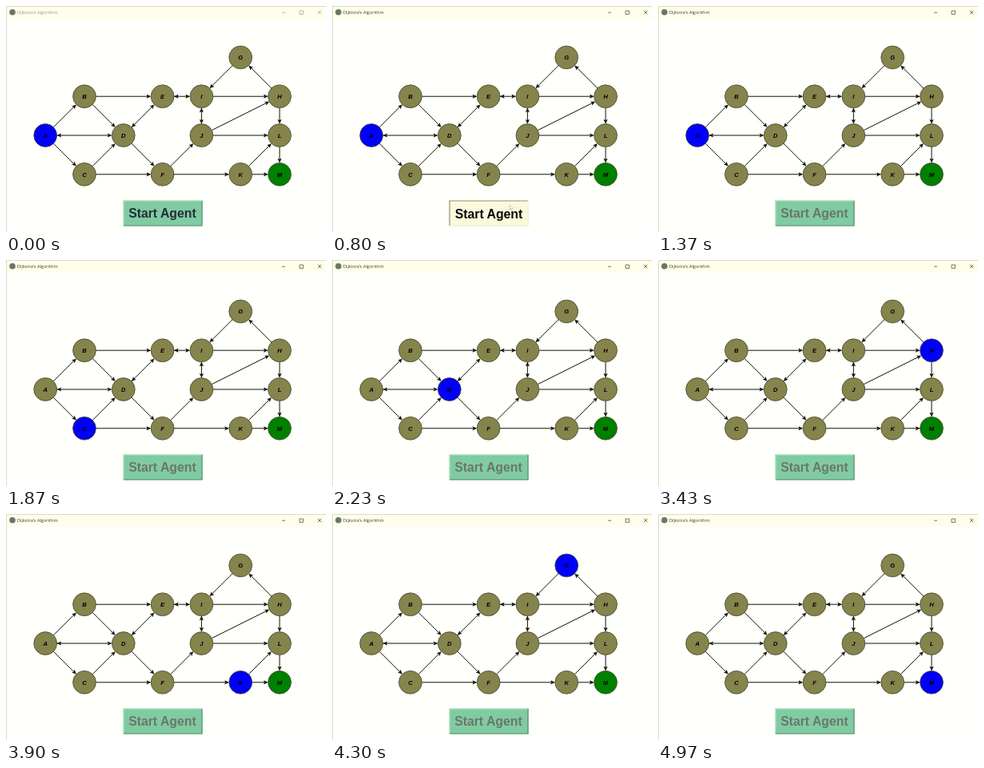
An HTML page that plays this animation: 400x283 px, repeating every 5010 ms.

```html
<!DOCTYPE html>
<html lang="en">
<head>
<meta charset="utf-8">
<title>Dijkstra's Algorithm</title>
<style>
  html, body { margin: 0; width: 100%; height: 100%; overflow: hidden; background: #fffffb; }
  svg { display: block; width: 100vw; height: 100vh; }
  .title { font: 5.6px "Open Sans", "Noto Sans", sans-serif; }
  .label { font: italic bold 7.6px "Liberation Sans", Arial, sans-serif; text-anchor: middle; }
  .button { font: bold 15.8px "Liberation Sans", Arial, sans-serif; text-anchor: middle; }
  .edge { stroke: #111108; stroke-width: 1; }
</style>
</head>
<body>
<svg viewBox="0 0 400 283">
  <rect width="400" height="283" fill="#fffffb"/>
  <rect width="400" height="16" fill="#fffeea"/>
  <path d="M0.5 283V0.5H400" fill="none" stroke="#d2d2b8" stroke-width="0.8"/>
  <circle cx="8" cy="7.8" r="3.8" fill="#68776a"/>
  <text id="title" class="title" x="14" y="9.8">Dijkstra's Algorithm</text>
  <path id="controls" d="M345 8.2h4M367 6h4.4v4.4h-4.4zM389.8 5.8l4.4 4.4M394.2 5.8l-4.4 4.4" fill="none" stroke-width="0.8"/>
  <g id="edges"></g>
  <g id="nodes"></g>
  <rect id="face" x="146.5" y="243.5" width="99" height="32"/>
  <path id="lit" d="M147 275V244H245" fill="none" stroke-width="1.2"/>
  <path id="shade" d="M147 275H245V244" fill="none" stroke-width="1.2"/>
  <text id="caption" class="button" y="265.4">Start Agent</text>
  <path id="cursor" d="M222 249v6l1.4-1.3 1 2.2.9-.4-1-2.1h1.8z" fill="#fff" stroke="#999984" stroke-width="0.5"/>
</svg>
<script>
const LOOP = 5010, RADIUS = 14.4, KHAKI = '#85844c';

// grid column and row, 48.8 px apart
const grid = {
  A: [0, 2], B: [1, 1], C: [1, 3], D: [2, 2], E: [3, 1], F: [3, 3], G: [5, 0],
  H: [6, 1], I: [4, 1], J: [4, 2], K: [5, 3], L: [6, 2], M: [6, 3]
};
const links = 'A>B A>C A=D B>D B>E C>D C>F D=E D>F E=I F>J F>K G>I H>G I>H I=J J>H J>L H>L K>L K>M L>M';
const visits = [
  [0, 'A'], [1500, 'B'], [1800, 'C'], [2100, 'D'], [2400, 'F'], [2700, 'E'], [3000, 'J'],
  [3300, 'H'], [3600, 'I'], [3900, 'K'], [4200, 'G'], [4500, 'L'], [4830, 'M']
];
const buttonSteps = [
  [0, { face: '#80cba2', text: '#222e39', lit: '#b9e6cb', shade: '#5a8f72' }],
  [670, { face: '#fafadb', text: '#0a0a0a', lit: '#fffff2', shade: '#9c9c88' }],
  [770, { face: '#fafadb', text: '#0a0a0a', lit: '#92927e', shade: '#eeeed8', shift: 0.6 }],
  [900, { face: '#80cba2', text: '#6b7769', lit: '#b9e6cb', shade: '#5a8f72' }]
];

const $ = id => document.getElementById(id);
const pos = name => ({ x: 49.2 + grid[name][0] * 48.8, y: 64.4 + grid[name][1] * 48.8 });
const stepAt = (steps, t) => steps.filter(s => s[0] <= t).pop()[1];

function add(parent, tag, attrs, text = '') {
  const el = document.createElementNS('http://www.w3.org/2000/svg', tag);
  for (const key in attrs) el.setAttribute(key, attrs[key]);
  el.textContent = text;
  return parent.appendChild(el);
}

function arrow(x, y, angle) {
  add($('edges'), 'path', {
    d: 'M0 0L-5.6 -2.6L-4.5 0L-5.6 2.6Z', fill: '#111108',
    transform: `translate(${x} ${y}) rotate(${angle * 180 / Math.PI})`
  });
}

for (const link of links.split(' ')) {
  const a = pos(link[0]), b = pos(link[2]);
  const angle = Math.atan2(b.y - a.y, b.x - a.x);
  const dx = Math.cos(angle) * RADIUS, dy = Math.sin(angle) * RADIUS;
  add($('edges'), 'line', { class: 'edge', x1: a.x + dx, y1: a.y + dy, x2: b.x - dx * 1.1, y2: b.y - dy * 1.1 });
  arrow(b.x - dx, b.y - dy, angle);
  if (link[1] === '=') arrow(a.x + dx, a.y + dy, angle + Math.PI);
}

const discs = {};
for (const name in grid) {
  const { x, y } = pos(name);
  discs[name] = add($('nodes'), 'circle', { cx: x, cy: y, r: RADIUS, stroke: '#45452c', 'stroke-width': 0.8 });
  add($('nodes'), 'text', { class: 'label', x, y: y + 2.7 }, name);
}

function draw(t) {
  const agent = stepAt(visits, t), look = stepAt(buttonSteps, t), shift = look.shift || 0;
  for (const name in discs) {
    discs[name].setAttribute('fill', name === agent ? '#0000fa' : name === 'M' ? '#008000' : KHAKI);
  }
  const active = t >= 770;
  $('title').setAttribute('fill', active ? '#3c3c35' : '#96968a');
  $('controls').setAttribute('stroke', active ? '#55554c' : '#a8a89a');
  $('face').setAttribute('fill', look.face);
  $('lit').setAttribute('stroke', look.lit);
  $('shade').setAttribute('stroke', look.shade);
  $('caption').setAttribute('fill', look.text);
  $('caption').setAttribute('x', 195.4 + shift);
  $('caption').setAttribute('y', 265.2 + shift);
  $('cursor').setAttribute('visibility', t >= 670 && t < 900 ? 'visible' : 'hidden');
}

function tick() {
  draw(performance.now() % LOOP);
  requestAnimationFrame(tick);
}
tick();
</script>
</body>
</html>
```
